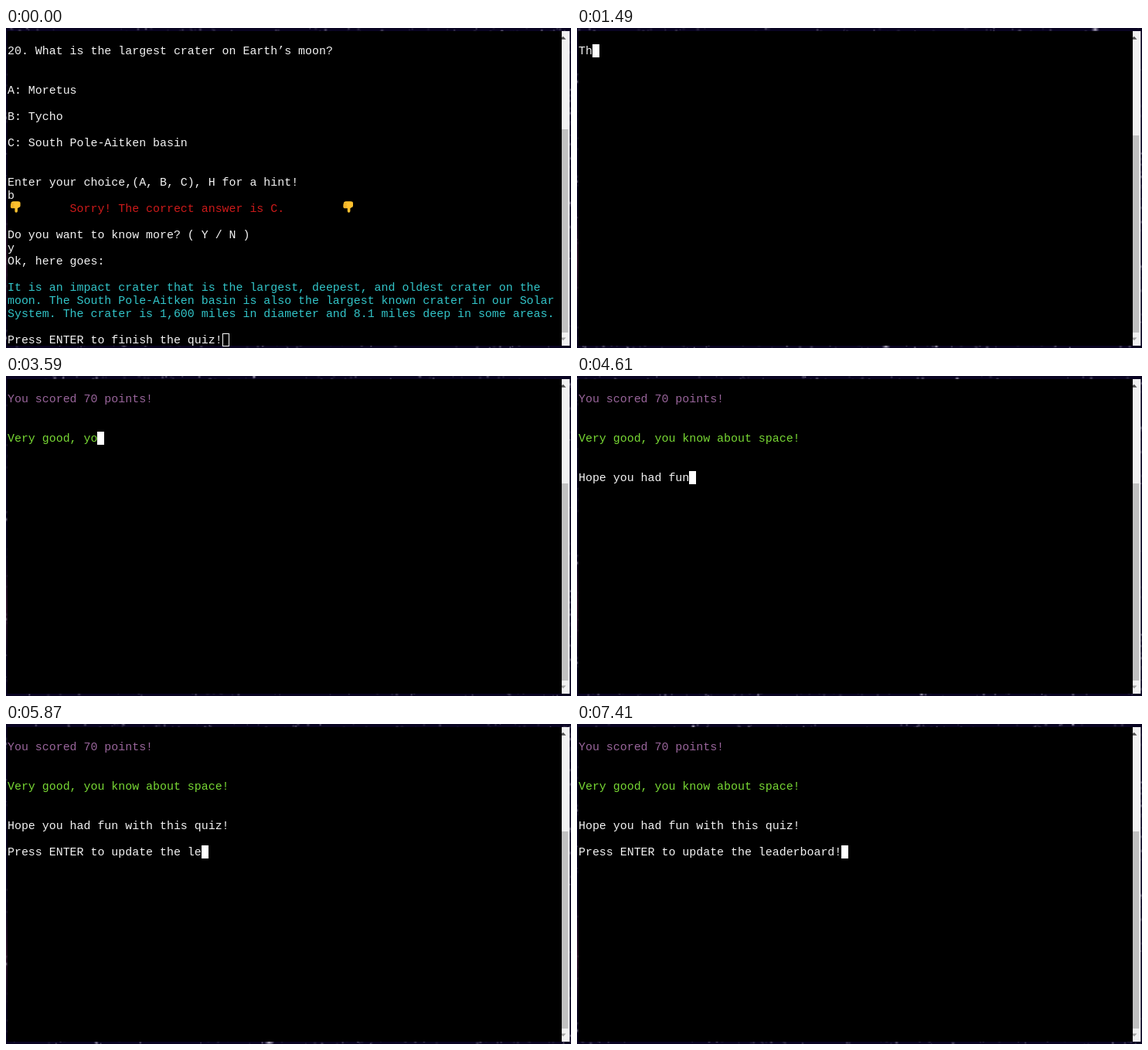
Write an HTML page with a canvas that moves like this. It is 731 px wide and 414 px high and loops after 7490 ms.

```html
<!DOCTYPE html>
<html lang="en">
<head>
<meta charset="utf-8">
<title>Space quiz terminal</title>
<style>
html, body { margin: 0; width: 100%; height: 100%; overflow: hidden; background: #090422; }
canvas, svg { position: absolute; left: 0; top: 0; display: block; }
text { font-family: "Liberation Mono", "Courier New", monospace; font-size: 14.93px; white-space: pre; }
</style>
</head>
<body>
<canvas id="sky" width="731" height="414"></canvas>
<svg width="731" height="414" viewBox="0 0 731 414">
  <defs>
    <g id="thumb">
      <path d="M1.5 .6Q2 0 4 0H9.5Q12.8 0 12.8 2.4V5.6Q12.8 7.6 10.8 8L9.2 9V12.8Q9 14.6 7.2 14.4Q5.6 14.2 5.6 12.6V9H2Q.3 9 .3 7.4Q-.3 6.5 .3 5.4Q-.2 4.3 .6 3.3Q.3 1.8 1.5 .6Z" fill="#fcc02e"/>
      <path d="M.6 3.2H4.6M.4 5.5H4.6M.8 7.5H4.6" stroke="#d9921c" stroke-width=".6"/>
    </g>
  </defs>
  <rect x="1.7" y="4" width="717.3" height="407"/>
  <rect x="719" y="4" width="10.3" height="407" fill="#f1f1f1"/>
  <rect id="bar" x="719" width="8.3" fill="#c1c1c1"/>
  <path d="M719 12.5L720.8 10.8L724.5 14.8H719Z" fill="#505050"/>
  <path d="M719 400.5H724.5L720.8 404.3L719 402.5Z" fill="#a3a3a3"/>
  <g id="thumbs">
    <use href="#thumb" x="5.8" y="224.3"/>
    <use href="#thumb" x="436.2" y="224.3"/>
  </g>
  <rect id="cursor"/>
  <g id="lines"></g>
</svg>
<script>
const LOOP = 7490, W = 731, H = 414;
const CELL = 8.958, ROW = 17, LEFT = 2, TOP = 21;
const FOCUS = 1180, RATE = 27.02;
const OVER_START = 1395, SCORE_START = 2548;
const WHITE = '#f4f4f4', RED = '#cc1a1a', CYAN = '#32c4c8', GREEN = '#78d834', PURPLE = '#99659b';

const QUESTION = [
  [0, '20. What is the largest crater on Earth’s moon?', WHITE],
  [3, 'A: Moretus', WHITE],
  [5, 'B: Tycho', WHITE],
  [7, 'C: South Pole-Aitken basin', WHITE],
  [10, 'Enter your choice,(A, B, C), H for a hint!', WHITE],
  [11, 'b', WHITE],
  [12, '         Sorry! The correct answer is C.', RED],
  [14, 'Do you want to know more? ( Y / N )', WHITE],
  [15, 'y', WHITE],
  [16, 'Ok, here goes:', WHITE],
  [18, 'It is an impact crater that is the largest, deepest, and oldest crater on the', CYAN],
  [19, 'moon. The South Pole-Aitken basin is also the largest known crater in our Solar', CYAN],
  [20, 'System. The crater is 1,600 miles in diameter and 8.1 miles deep in some areas.', CYAN],
  [22, 'Press ENTER to finish the quiz!', WHITE]
];
const OVER = [[0, 'The quiz is now over!', WHITE]];
const SCORE = [
  [0, 'You scored 70 points!', PURPLE],
  [3, 'Very good, you know about space!', GREEN],
  [6, 'Hope you had fun with this quiz!', WHITE],
  [8, 'Press ENTER to update the leaderboard!', WHITE]
];

// The screen refreshes in bursts: start, end, count.
const BURSTS = [
  [90, 780, 10], [870, 1330, 7], [1490, 2180, 10], [2250, 2730, 7],
  [2900, 3590, 10], [3660, 3910, 4], [4080, 4770, 10], [4860, 5540, 10],
  [5620, 6330, 10], [6400, 7110, 10], [7180, 7410, 4]
];
const ticks = [0];
for (const [a, b, n] of BURSTS)
  for (let i = 0; i < n; i++) ticks.push(Math.floor((a + (b - a) * i / (n - 1)) / 10) * 10);

const $ = id => document.getElementById(id);
const ctx = $('sky').getContext('2d');

function setAttrs(el, attrs) {
  for (const k in attrs) el.setAttribute(k, attrs[k]);
  return el;
}

let seed = 41;
function rnd() {
  seed = (seed * 16807) % 2147483647;
  return seed / 2147483647;
}
const stars = Array.from({ length: 4200 }, () => {
  const big = rnd() < 0.025;
  return {
    x: rnd() * W, y: rnd() * H,
    r: big ? 3 + rnd() * 4 : 1.5 + rnd() * 2,
    a: big ? 0.9 : 0.1 + 0.4 * rnd() ** 2
  };
});

function drawSky(t) {
  ctx.fillStyle = '#090422';
  ctx.fillRect(0, 0, W, H);
  const glow = ctx.createLinearGradient(0, 230, 0, 370);
  glow.addColorStop(0, 'rgba(70,30,55,0)');
  glow.addColorStop(0.5, 'rgba(70,30,55,.7)');
  glow.addColorStop(1, 'rgba(70,30,55,0)');
  ctx.fillStyle = glow;
  ctx.fillRect(0, 230, 3, 140);
  for (const s of stars) {
    const y = (s.y + t / LOOP * H) % H;
    const hidden = y > 10 && y < H - 9 && s.x > 8 && s.x < W - 8;
    if (hidden) continue;
    const g = ctx.createRadialGradient(s.x, y, 0, s.x, y, s.r);
    g.addColorStop(0, `rgba(215,210,225,${s.a})`);
    g.addColorStop(1, 'rgba(120,110,150,0)');
    ctx.fillStyle = g;
    ctx.fillRect(s.x - s.r, y - s.r, 2 * s.r, 2 * s.r);
  }
}

// Types rows one character at a time; each line break costs one step.
function type(rows, steps) {
  const lines = [];
  let at = -1, col = 0;
  for (const [row, text, color] of rows) {
    const breaks = row - at;
    if (steps < breaks) {
      if (steps > 0) { at += steps; col = 0; }
      break;
    }
    steps -= breaks;
    col = Math.min(steps, text.length);
    at = row;
    lines.push([row, text.slice(0, col), color]);
    steps -= col;
    if (col < text.length) break;
  }
  return { lines, row: at, col };
}

function screenAt(t) {
  if (t < OVER_START) return { lines: QUESTION, row: 22, col: 31 };
  const [rows, start] = t < SCORE_START ? [OVER, OVER_START] : [SCORE, SCORE_START];
  return type(rows, Math.floor((t - start) / RATE));
}

function drawCursor(row, col, solid) {
  const inset = solid ? 0 : 0.5;
  setAttrs($('cursor'), {
    x: Math.round(LEFT + col * CELL) + inset,
    y: TOP + row * ROW + inset,
    width: 9 - 2 * inset, height: ROW - 2 * inset,
    fill: solid ? '#fff' : 'none',
    stroke: solid ? 'none' : '#fff'
  });
}

function draw(t) {
  const { lines, row, col } = screenAt(t);
  const quiz = t < OVER_START;
  drawSky(t);
  $('lines').replaceChildren(...lines.map(([r, text, color]) => {
    const el = document.createElementNS('http://www.w3.org/2000/svg', 'text');
    el.textContent = text;
    return setAttrs(el, { x: LEFT, y: TOP + 13 + r * ROW, fill: color });
  }));
  $('thumbs').setAttribute('visibility', quiz ? 'visible' : 'hidden');
  const top = quiz ? 131 : 139;
  setAttrs($('bar'), { y: top, height: 394 - top });
  drawCursor(row, col, t >= FOCUS);
}

let shown = -1;
function frame() {
  const t = performance.now() % LOOP;
  let i = ticks.length - 1;
  while (ticks[i] > t) i--;
  if (i !== shown) draw(ticks[shown = i]);
  requestAnimationFrame(frame);
}
frame();
</script>
</body>
</html>
```
